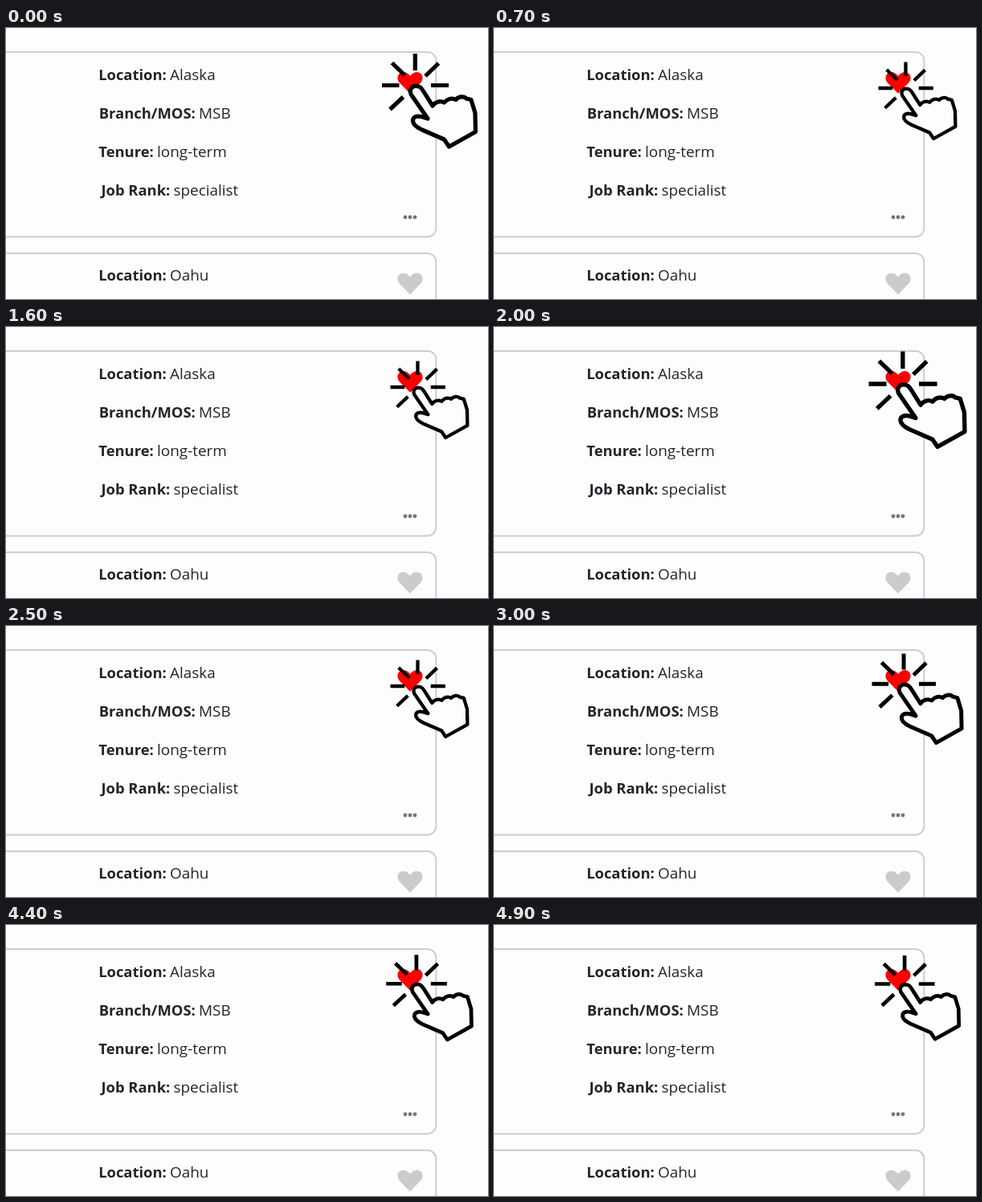
Animation, 600 px wide and 338 px high, one loop 5000 ms. Source, as an HTML page:

```html
<!DOCTYPE html>
<html lang="en">
<head>
<meta charset="utf-8">
<title>Job cards</title>
<style>
  html, body { margin: 0; width: 100%; height: 100%; overflow: hidden; background: #fefdfe; }
  svg { display: block; width: 100vw; height: 100vh; }
  text { font: 18.9px "Open Sans", "Noto Sans", sans-serif; fill: #212529; }
  .label { font-size: 18.4px; font-weight: 700; text-anchor: end; }
  .card { fill: none; stroke: #cdcdcf; stroke-width: 2; }
  .hand { fill: none; stroke: #000; stroke-width: 5.2; }
</style>
</head>
<body>
<svg viewBox="0 0 600 338">
  <defs>
    <path id="heart" d="M0 13.4 L-13 0 C-17 -4.4 -16 -10.2 -12.3 -12.2 C-8 -14.7 -3.5 -13 0 -8.6 C3.5 -13 8 -14.7 12.3 -12.2 C16 -10.2 17 -4.4 13 0 Z"/>
  </defs>
  <rect class="card" x="-30" y="30" width="565.3" height="230.4" rx="10.5"/>
  <rect class="card" x="-30" y="281" width="565.3" height="230.4" rx="10.5"/>
  <g id="rows"></g>
  <g fill="#75757b">
    <circle cx="497" cy="236" r="2.4"/>
    <circle cx="503" cy="236" r="2.4"/>
    <circle cx="509" cy="236" r="2.4"/>
  </g>
  <use href="#heart" x="503" y="68.4" fill="#f00"/>
  <use href="#heart" x="503" y="319" fill="#cbcbcb"/>
  <g class="hand" id="hand">
    <path d="M509.3 32V53 M468 71.5H489.5 M529 71.5H551 M480.5 43.5L496.5 59 M538.5 44L522 60 M478 101.5L494.5 86"/>
    <path fill="#fefdfe" stroke-linejoin="round" d="M504.3 83 C501.5 77 505 72.3 510 72.3 C515 72.3 517 74.5 520 79.5 L531 97 C534 92.5 540 90 545.5 93 C549 88.5 555 86.5 560 89.5 C563 85.5 570 84.5 573 88 L579 89.5 L584 106 L584.5 129.5 L551.5 148 L545.5 139 L518 127 C510.5 123.5 506.5 119.5 506.5 115.5 C506.5 110.5 511.5 109.3 517 110.5 L525 113 Z"/>
  </g>
</svg>
<script>
  const rows = [
    ["Location:", "Alaska", 204, 65],
    ["Branch/MOS:", "MSB", 240, 113],
    ["Tenure:", "long-term", 188, 161],
    ["Job Rank:", "specialist", 208.5, 209],
    ["Location:", "Oahu", 204, 315]
  ];
  const LOOP = 5000, STEP = 100, GAP = 4.2;
  // Hand size in pixels at each step of one pulse
  const sizes = [119, 130, 122, 114, 107, 99, 91, 98, 108.5];
  const center = [527.3, 91.3];
  const hand = document.getElementById("hand");

  function addText(str, x, y, cls) {
    const el = document.createElementNS("http://www.w3.org/2000/svg", "text");
    el.setAttribute("x", x);
    el.setAttribute("y", y);
    if (cls) el.setAttribute("class", cls);
    el.textContent = str;
    document.getElementById("rows").append(el);
  }

  for (const [label, value, x, y] of rows) {
    addText(label, x - GAP, y, "label");
    addText(value, x, y);
  }

  const start = performance.now();

  function draw(now) {
    const t = Math.max(0, now - start) % LOOP;
    const scale = sizes[Math.floor(t / STEP) % sizes.length] / sizes[0];
    const [x, y] = center;
    hand.setAttribute("transform", `translate(${x} ${y}) scale(${scale}) translate(${-x} ${-y})`);
    requestAnimationFrame(draw);
  }
  draw(start);
</script>
</body>
</html>
```
